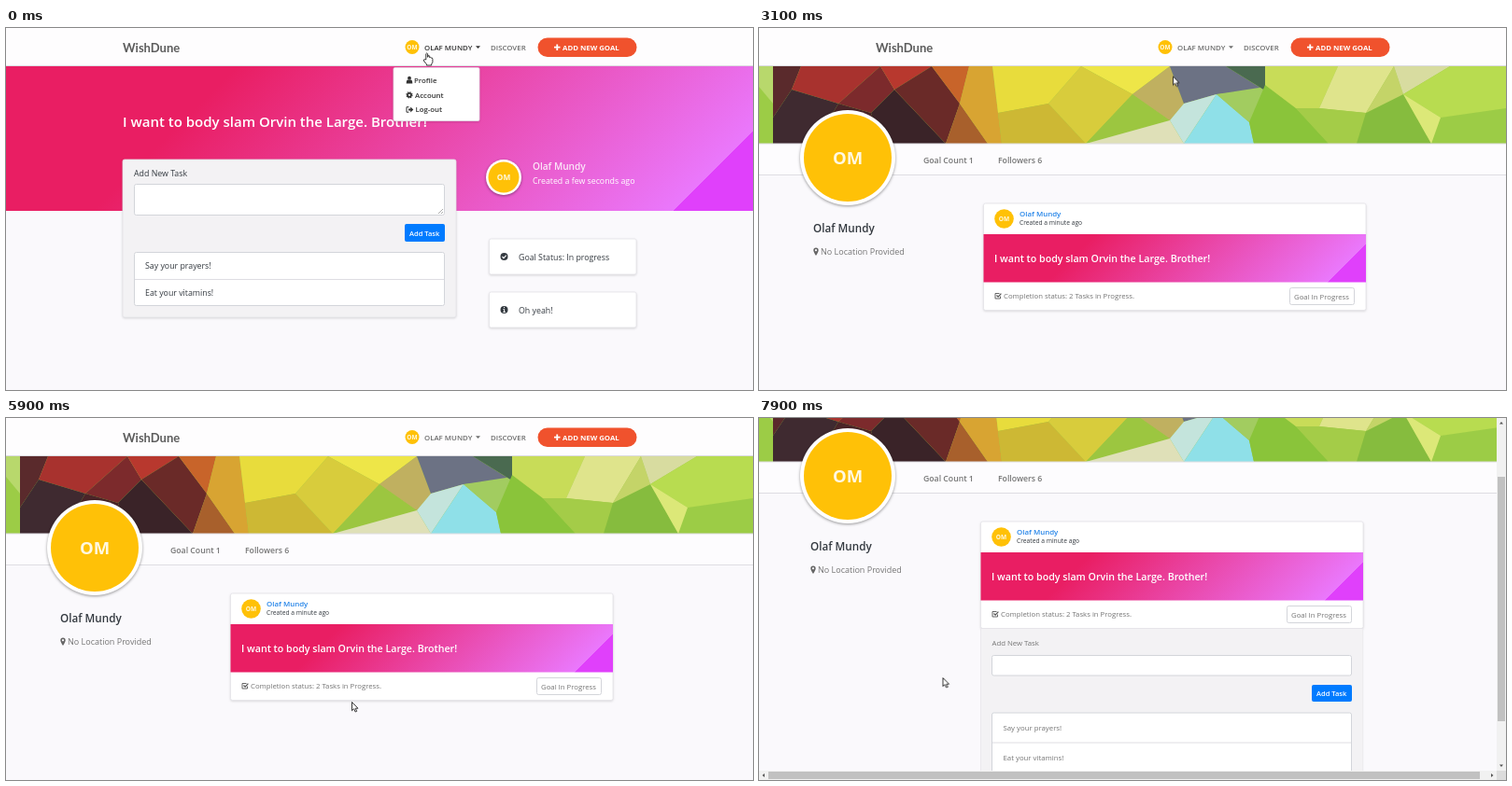
Animation, 800 px wide and 388 px high, one loop 8000 ms. Source, as an HTML page:

```html
<!DOCTYPE html>
<html lang="en">
<head>
<meta charset="utf-8">
<title>Goal profile</title>
<style>
html, body { margin: 0; width: 100%; height: 100%; overflow: hidden; background: #faf9fc; }
#stage { display: block; width: 800px; height: 388px; font: 8.8px "Open Sans", "Noto Sans", sans-serif; fill: #343a40; }
.b { font-weight: 600; }
.w { fill: #fff; }
.g { fill: #757575; }
.mid { text-anchor: middle; font-weight: 700; fill: #fff8e1; }
.nav { font-size: 7.85px; font-weight: 600; fill: #6c6c6c; }
.menu { font-size: 7.8px; font-weight: 600; fill: #333; }
.small { font-size: 7.75px; }
.card { fill: #fff; stroke: #e4e3e8; stroke-width: .8; filter: drop-shadow(0 1px 1px #0002); }
.field { fill: #fff; stroke: #d3d5da; }
.ring { fill: #fff; filter: drop-shadow(0 1px 1.5px #0006); }
.gold { fill: #ffc107; }
.line { stroke: #dedde2; fill: none; }

/* Hard switches */
.goal, .next, .name, .item, .status, .dots, .bars, .hand, .arrow, .shift { animation: 8s step-end infinite; }
.goal { animation-name: goal; }
.next { animation-name: next; }
.name { animation-name: name; }
.item { animation-name: item; }
.status { animation-name: status; }
.dots { animation-name: dots; }
.bars { animation-name: bars; }
.hand { animation-name: hand; }
.arrow { animation-name: arrow; }
.shift { animation-name: shift; --d: -3px; }
.far { --d: -5px; }
@keyframes goal { 0% { visibility: visible } 32.5%, 100% { visibility: hidden } }
@keyframes next { 0% { visibility: hidden } 32.5%, 100% { visibility: visible } }
@keyframes name { 0% { fill: #333 } 2.5%, 100% { fill: #6c6c6c } }
@keyframes item { 0% { opacity: 0 } 5%, 100% { opacity: 1 } }
@keyframes status {
  0%, 71.25%, 93.75%, 100% { fill: #757575 }
  52.5%, 83.75% { fill: #2d3238 }
}
@keyframes dots {
  0%, 72.5%, 97%, 100% { opacity: 0 }
  50%, 81.25% { opacity: 1 }
}
@keyframes bars { 0% { opacity: 0 } 90%, 100% { opacity: 1 } }
@keyframes hand {
  0%, 52.5%, 83.75% { opacity: 1 }
  15%, 71.25%, 93.75%, 100% { opacity: 0 }
}
@keyframes arrow {
  0%, 52.5%, 83.75% { opacity: 0 }
  15%, 71.25%, 93.75%, 100% { opacity: 1 }
}
@keyframes shift { 0% { transform: none } 90%, 100% { transform: translateX(var(--d)) } }

/* Smooth motion */
.cursor { animation: move 8s linear infinite; }
.panel { animation: open 8s linear infinite; }
.scroll { --y: -77px; animation: scroll 8s linear infinite; }
.thumb { --y: 53px; animation: scroll 8s linear infinite; }
@keyframes move {
  0%, .7% { transform: translate(450px, 27px) }
  7.5%, 41.25% { transform: translate(443px, 51.5px) }
  48.75% { transform: translate(429px, 183px) }
  53.75%, 58.75% { transform: translate(346px, 277px) }
  66.25%, 70% { transform: translate(388px, 280px) }
  73.75% { transform: translate(370px, 304px) }
  81.25% { transform: translate(362px, 301px) }
  85%, 92.5% { transform: translate(348px, 287px) }
  98.75%, 100% { transform: translate(196.5px, 278px) }
}
@keyframes open {
  0%, 88.5% { clip-path: inset(0 0 100% 0) }
  92%, 100% { clip-path: inset(0) }
}
@keyframes scroll {
  0%, 93.2% { transform: none; animation-timing-function: ease-in-out }
  98%, 100% { transform: translateY(var(--y)) }
}
</style>
</head>
<body>
<svg id="stage" viewBox="0 0 800 388">
  <defs>
    <linearGradient id="pink" gradientUnits="userSpaceOnUse" x2="477.5" y2="477.5">
      <stop offset=".26" stop-color="#e91e63"/>
      <stop offset=".91" stop-color="#ea78fc"/>
      <stop offset=".91" stop-color="#e040fb"/>
    </linearGradient>
    <linearGradient id="pinkCard" href="#pink" x2="230.5" y2="230.5"/>
  </defs>
  <rect width="800" height="388" fill="#faf9fc"/>

  <g class="scroll">
    <!-- Goal page -->
    <g class="goal">
      <rect width="800" height="155" transform="translate(0 41)" fill="url(#pink)"/>
      <text class="b w" x="125" y="106" font-size="15">I want to body slam Orvin the Large. Brother!</text>
      <rect class="card" x="125" y="141" width="357" height="169" rx="2" style="fill:#f3f2f4"/>
      <text x="137" y="159">Add New Task</text>
      <rect class="field" x="137.5" y="167.5" width="332" height="33" rx="2"/>
      <path d="M463 199l5-5M466 199l2-2" stroke="#888" stroke-width=".7"/>
      <rect x="427" y="210" width="43" height="19" rx="2" fill="#007bff"/>
      <text class="b w" x="432" y="222.7" font-size="7.5">Add Task</text>
      <rect class="field" x="137.5" y="240.5" width="332" height="57" rx="2"/>
      <path class="line" d="M138 269.5H469"/>
      <text x="149" y="258">Say your prayers!</text>
      <text x="149" y="287">Eat your vitamins!</text>

      <circle class="ring" cx="533" cy="160" r="19"/>
      <circle class="gold" cx="533" cy="160" r="16.5"/>
      <text class="mid" x="533" y="163" font-size="8.3">OM</text>
      <text class="b w" x="564" y="151.5" font-size="10.1" opacity=".85">Olaf Mundy</text>
      <text class="w" x="564" y="167">Created a few seconds ago</text>

      <rect class="card" x="517.5" y="226" width="157.5" height="38" rx="2"/>
      <circle cx="533.5" cy="245" r="4"/>
      <path d="M531.5 245l1.5 1.6 2.7-2.9" fill="none" stroke="#fff" stroke-width="1.1"/>
      <text x="549" y="248.5">Goal Status: In progress</text>
      <rect class="card" x="517.5" y="283" width="157.5" height="38" rx="2"/>
      <circle cx="533.5" cy="302" r="4"/>
      <path d="M533.5 299v1.2M532.5 301.5h1.1v3M532.4 304.4h2.4" fill="none" stroke="#fff"/>
      <text x="549" y="305.5">Oh yeah!</text>
    </g>

    <!-- Profile page -->
    <g class="next">
      <svg y="41" width="800" height="83" viewBox="0 0 800 83">
        <rect width="800" height="83" fill="#9ccc46"/>
        <path fill="#b8d86c" d="M0 0H15V40L0 22z"/>
        <path fill="#5a2a2c" d="M15 0H45L35 25 15 55z"/>
        <path fill="#a8322e" d="M45 0H130L85 40 35 25z"/>
        <path fill="#3f2a30" d="M15 55L35 25 85 40 60 83H15z"/>
        <path fill="#7c2a2c" d="M85 40L130 0 145 25 120 50z"/>
        <path fill="#4a2428" d="M85 40L120 50 130 83H60z"/>
        <path fill="#b8382e" d="M130 0H185L145 25z"/>
        <path fill="#3a2328" d="M120 50L145 25 200 83H130z"/>
        <path fill="#6a2a28" d="M145 25L185 0 215 40 200 83z"/>
        <path fill="#c8642a" d="M185 0H225L215 40z"/>
        <path fill="#a8602c" d="M215 40L245 83H200z"/>
        <path fill="#d8a432" d="M225 0H250L256 50 260 83H245L215 40z"/>
        <path fill="#e8dc3c" d="M250 0H345L310 40 256 50z"/>
        <path fill="#cdb834" d="M256 50L310 40 350 83H260z"/>
        <path fill="#eee648" d="M345 0H440L400 30z"/>
        <path fill="#d8cc3c" d="M345 0L400 30 350 83 310 40z"/>
        <path fill="#9cc640" d="M400 30L440 58 350 83z"/>
        <path fill="#c0b060" d="M440 0L455 40 440 58 400 30z"/>
        <path fill="#dfe0b8" d="M440 58L455 83H350z"/>
        <path fill="#6c7284" d="M440 0H500L540 25 490 30 455 40z"/>
        <path fill="#c4e4dc" d="M455 40L490 30 455 83 440 58z"/>
        <path fill="#8fe0e8" d="M490 30L525 60 530 83H455z"/>
        <path fill="#a2cc60" d="M490 30L542 22 525 60z"/>
        <path fill="#4a6a50" d="M500 0H542V26z"/>
        <path fill="#8ac43a" d="M542 20L575 45 610 83H530L525 60z"/>
        <path fill="#c8dc58" d="M542 0H620L600 45H575L542 20z"/>
        <path fill="#dfe48c" d="M620 0H680L650 50 600 45z"/>
        <path fill="#a4cc48" d="M575 45H600L650 50 640 83H610z"/>
        <path fill="#86bc3e" d="M650 50L690 30 720 83H640z"/>
        <path fill="#c4d468" d="M680 0L690 30 650 50z"/>
        <path fill="#d8dca0" d="M680 0H740L690 30z"/>
        <path fill="#b8dc50" d="M740 0H800V45L730 55 690 30z"/>
        <path fill="#dce878" d="M690 30L730 55 720 83z"/>
      </svg>
      <path fill="#fdfcfe" d="M0 124H800V157H0z"/>
      <path class="line" d="M0 157.5H800M0 124H800"/>
      <circle class="ring" cx="95" cy="139" r="51"/>
      <circle class="gold" cx="95" cy="139" r="47"/>
      <text class="mid" x="95" y="146" font-size="18.5">OM</text>
      <g class="b g" font-size="8.7">
        <text x="176" y="145">Goal Count 1</text>
        <text x="256" y="145">Followers 6</text>
      </g>

      <g class="shift">
        <text class="b" x="58" y="219" font-size="11.7">Olaf Mundy</text>
        <path fill="#666" fill-rule="evenodd" d="M61 244q-2.7-4-2.7-5.8a2.7 2.7 0 0 1 5.4 0q0 1.8-2.7 5.8zM61 237a1.1 1.1 0 1 0 .01 0z"/>
        <text class="g" x="66" y="243" font-size="9">No Location Provided</text>

        <rect class="card" x="240.5" y="188" width="409.5" height="114.5" rx="2"/>
        <circle class="gold" cx="262.5" cy="204.5" r="10.3"/>
        <text class="mid" x="262.5" y="207" font-size="6.5">OM</text>
        <text class="b" x="279" y="202" font-size="7.9" fill="#2484e8">Olaf Mundy</text>
        <text x="279" y="211" font-size="6.7">Created a minute ago</text>
        <path class="dots" d="M631 201h0M634 201h0M637 201h0" stroke="#333" stroke-width="2.4" stroke-linecap="round"/>
        <rect width="409.5" height="51.5" transform="translate(240.5 221)" fill="url(#pinkCard)"/>
        <text class="b w" x="252" y="251" font-size="10.65">I want to body slam Orvin the Large. Brother!</text>
        <g class="status small">
          <path d="M258.5 287.5v2.5H253v-5.5h4.500" fill="none" stroke="#555" stroke-width=".9"/>
          <path d="M254.5 286.5l1.600 1.700 3.300-3.600" fill="none" stroke="#555" stroke-width="1.2"/>
          <text x="262" y="290">Completion status: 2 Tasks in Progress.</text>
        </g>
        <rect class="field" x="568.5" y="278.5" width="69" height="18" rx="2"/>
        <text class="g small" x="573" y="290.5">Goal In Progress</text>

        <g class="panel">
          <path fill="#f3f2f4" stroke="#e4e3e8" stroke-width=".8" d="M240.5 302.500H650V471H240.5z"/>
          <text class="g small" x="252.5" y="321">Add New Task</text>
          <rect class="field" x="252.5" y="331.5" width="385" height="21.5" rx="2"/>
          <rect x="595" y="363" width="43" height="18" rx="2" fill="#007bff"/>
          <text class="b w" x="600" y="375" font-size="7.5">Add Task</text>
          <rect class="field" x="252.5" y="393" width="385" height="64" rx="2"/>
          <path class="line" d="M253 425H637"/>
          <g class="g" font-size="7.8">
            <text x="264.5" y="412">Say your prayers!</text>
            <text x="264.5" y="444">Eat your vitamins!</text>
          </g>
        </g>
      </g>
    </g>

    <!-- Top bar -->
    <path fill="#fefdfe" d="M0 0H800V40H0z"/>
    <path stroke="#dcdbe0" d="M0 40.5H800"/>
    <g class="shift far">
      <text x="125" y="25.5" font-size="13" font-weight="700" fill="#5c5c5c" style="font-family:Lato,sans-serif">WishDune</text>
      <circle class="gold" cx="435" cy="20.5" r="7.5"/>
      <text class="mid" x="435" y="22.9" font-size="6.5">OM</text>
      <g class="nav">
        <g class="name">
          <text x="448" y="23.5">OLAF MUNDY</text>
          <path d="M503 19.3h5l-2.5 2.7z"/>
        </g>
        <text x="519" y="23.5">DISCOVER</text>
      </g>
      <rect x="569.5" y="10.5" width="106" height="20.5" rx="10.25" fill="#f0522d"/>
      <path d="M587 20.7h6.5M590.25 17.5v6.5" stroke="#fff" stroke-width="1.8"/>
      <text class="w" x="596" y="23.7" font-size="7.8" font-weight="700">ADD NEW GOAL</text>
    </g>

    <!-- Account menu -->
    <g class="goal menu">
      <rect class="card" x="415" y="42.5" width="92" height="57" rx="1.5"/>
      <path class="item" fill="#2196fb" d="M415 48H507V63.5H415z"/>
      <circle cx="432" cy="53.7" r="1.9"/>
      <path d="M428.7 59.5q0-4 1.8-4h3q1.8 0 1.8 4z"/>
      <text x="437" y="58.7">Profile</text>
      <circle cx="432" cy="71.8" r="2" fill="none" stroke="#333" stroke-width="1.7"/>
      <circle cx="432" cy="71.8" r="3.1" fill="none" stroke="#333" stroke-width="1.1" stroke-dasharray="1.3 1.135"/>
      <text x="438" y="74.6">Account</text>
      <path d="M431.5 84.7H429v5.5h2.5" fill="none" stroke="#333"/>
      <path d="M431 86.5h2.2v-2l3.1 3-3.1 3v-2H431z"/>
      <text x="438.5" y="90.4">Log-out</text>
    </g>
  </g>

  <!-- Scrollbars -->
  <g class="bars">
    <path fill="#f1f1f1" d="M790 0H800V388H0V378H790z"/>
    <path fill="#c1c1c1" d="M10 379H772V387H10z"/>
    <path class="thumb" fill="#c1c1c1" d="M791 10H799V272H791z"/>
    <path fill="#555" d="M793 6.5h4l-2-2.5zM793 371.5h4l-2 2.5zM6 381v4l-2.5-2zM784 381v4l2.5-2z"/>
    <path fill="#dcdcdc" d="M790 378h10v10h-10z"/>
  </g>

  <g class="cursor" stroke="#222" stroke-width=".9" stroke-linejoin="round" fill="#fff">
    <path class="arrow" d="M.5 .5V9.700L2.600 7.700 4.200 11 5.700 10.300 4.200 7.200H7z"/>
    <path class="hand" d="M-.2 7V.7Q.7-.8 1.6 .7V4.300Q3-.1 3.500 4.600 4.800 3.500 5.300 5.100 6.900 4.500 6.900 6.300V9.500L5.700 11.700V13H.4V11.800L-2.700 8Q-2.700 6.300-1.300 6.700z"/>
  </g>
</svg>
</body>
</html>
```
